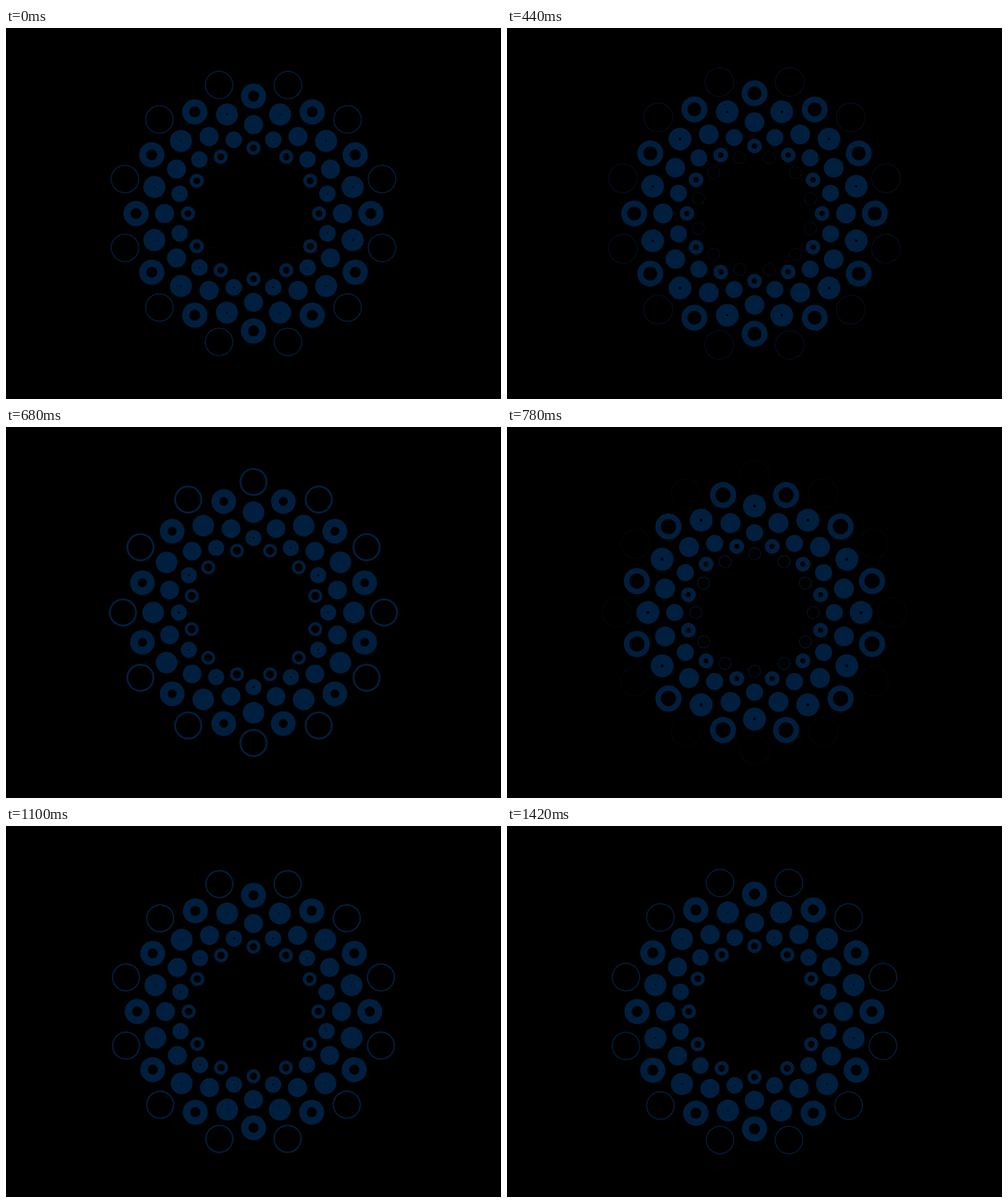
Animation, 800 px wide and 600 px high, one loop 1440 ms. Source, as an HTML page with a canvas:

```html
<!DOCTYPE html>
<html lang="en">
<head>
<meta charset="utf-8">
<title>Expanding rings</title>
<style>
  html, body { margin: 0; width: 100%; height: 100%; overflow: hidden; background: #000; }
  canvas { display: block; }
</style>
</head>
<body>
<canvas id="stage" width="800" height="600"></canvas>
<script>
const ctx = document.getElementById('stage').getContext('2d');
const LOOP = 1440, TRAVEL = 1430, STEP = 20;
const COUNT = 12, SIZE = 0.1075, POWER = 3.42;

// Hole radius relative to the disc, sampled every half ring of travel.
const HOLE = [0.985, 0.83, 0.49, 0.25, 0.08, -0.01, 0, -0.02, 0.065, 0.205, 0.44, 0.7, 0.925, 1.015];

function ease(x) {
  return x < 0.5 ? (2 * x) ** POWER / 2 : 1 - (2 - 2 * x) ** POWER / 2;
}

function distance(u) {
  return 91.1 + u * (13.345 + u * (1.572 - u * 0.0587));
}

// Catmull-Rom interpolation through the samples.
function holeRatio(u) {
  const i = Math.floor(u * 2), f = u * 2 - i;
  const at = n => HOLE[Math.max(0, Math.min(HOLE.length - 1, n))];
  const a = at(i - 1), b = at(i), c = at(i + 1), d = at(i + 2);
  const v = b + f / 2 * (c - a + f * (2 * a - 5 * b + 4 * c - d + f * (3 * (b - c) + d - a)));
  return Math.max(0, v);
}

function drawRing(u, turn) {
  const dist = distance(u), r = dist * SIZE, hole = r * holeRatio(u);
  if (hole >= r) return;
  for (let i = 0; i < COUNT; i++) {
    const angle = (i + turn) * 2 * Math.PI / COUNT;
    const x = 400 + dist * Math.cos(angle), y = 300 + dist * Math.sin(angle);
    ctx.beginPath();
    ctx.arc(x, y, r, 0, 2 * Math.PI);
    if (hole > 0) {
      ctx.moveTo(x + hole, y);
      ctx.arc(x, y, hole, 0, 2 * Math.PI, true);
    }
    ctx.fill();
  }
}

function draw() {
  const t = Math.floor(performance.now() % LOOP / STEP) * STEP;
  const shift = 2 * ease(Math.min(1, t / TRAVEL));
  ctx.fillStyle = '#000';
  ctx.fillRect(0, 0, 800, 600);
  ctx.fillStyle = '#001f3f';
  for (let k = -2; k <= 6; k++) {
    const u = k + shift;
    if (u >= 0 && u < 6.5) drawRing(u, k % 2 ? 0 : 0.5);
  }
  requestAnimationFrame(draw);
}
draw();
</script>
</body>
</html>
```
